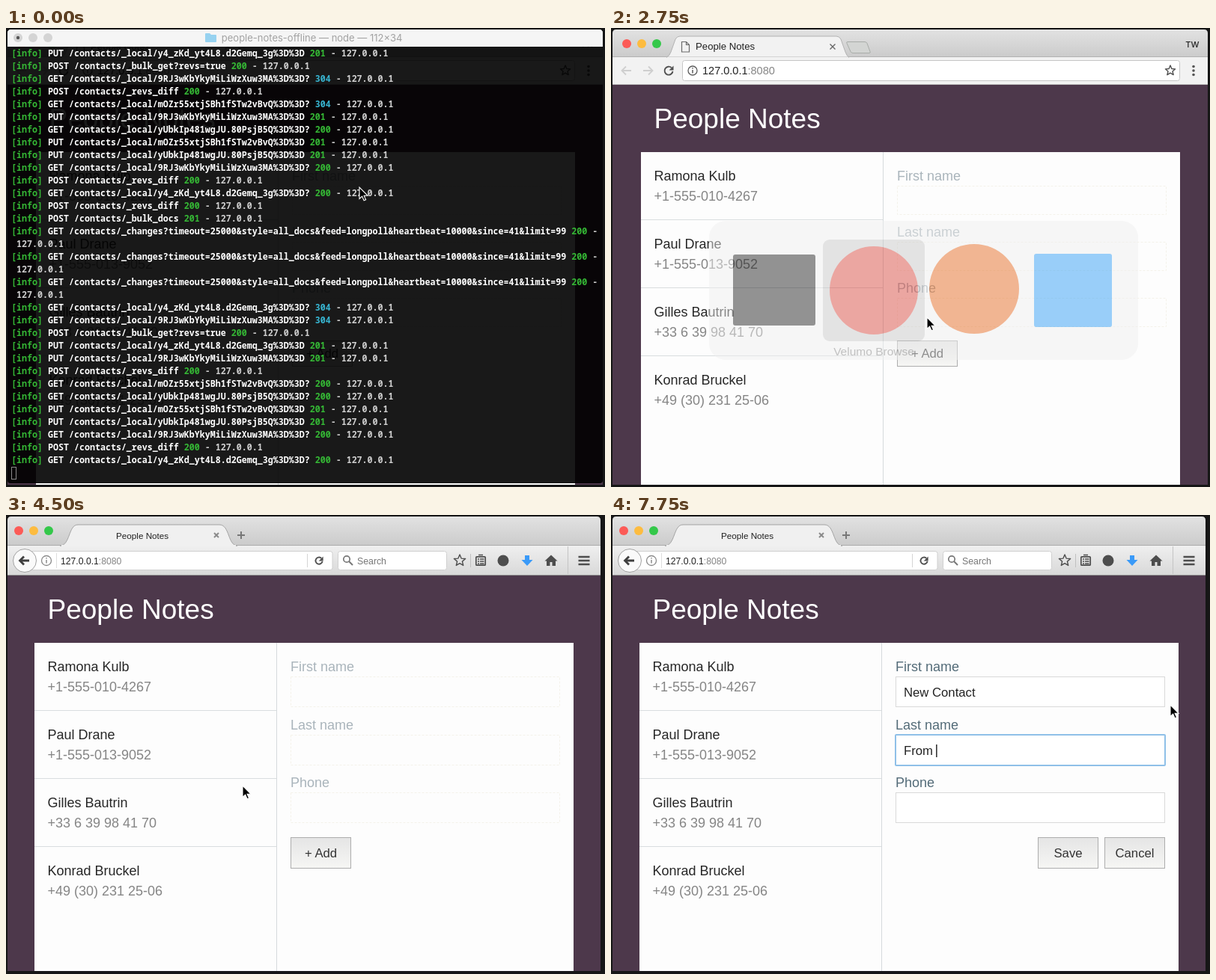
An HTML page that plays this animation: 800x614 px, repeating every 8 s.

```html
<!DOCTYPE html>
<html lang="en">
<head>
<meta charset="utf-8">
<title>Offline sync demo</title>
<style>
html, body { margin: 0; width: 100%; height: 100%; overflow: hidden; background: #161616; }
svg { display: block; width: 800px; height: 614px; font-family: "Liberation Sans", Arial, sans-serif; }
text { white-space: pre; }
.mono { font: 600 11.667px "Noto Sans Mono", "DejaVu Sans Mono", monospace; }
.ui { font-family: Inter, "Liberation Sans", sans-serif; }
</style>
</head>
<body>
<svg id="stage" viewBox="0 0 800 614">
  <defs>
    <linearGradient id="strip" x2="0" y2="1"><stop stop-color="#e2e2e2"/><stop offset="1" stop-color="#cbcbcb"/></linearGradient>
    <linearGradient id="bar" x2="0" y2="1"><stop stop-color="#f0f0f0"/><stop offset="1" stop-color="#d8d8d8"/></linearGradient>
    <linearGradient id="button" x2="0" y2="1"><stop stop-color="#e5e5e5"/><stop offset="1" stop-color="#f6f6f4"/></linearGradient>
    <linearGradient id="smoke" x2="0" y2="1"><stop stop-color="#737373"/><stop offset=".5" stop-color="#696969"/><stop offset="1" stop-color="#747474"/></linearGradient>
  </defs>
  <g id="scene"></g>
</svg>
<script>
const PURPLE = '#4d384b';
const APP = 'People Notes';
const FOLDER = 'people-notes-offline';
const PEOPLE = [
  ['Ramona Kulb', '+1-555-010-4267'],
  ['Paul Drane', '+1-555-013-9052'],
  ['Gilles Bautrin', '+33 6 39 98 41 70'],
  ['Konrad Bruckel', '+49 (30) 231 25-06'],
];

const text = (x, y, s, size, fill, more = '') =>
  `<text x="${x}" y="${y}" font-size="${size}" fill="${fill}" ${more}>${s}</text>`;
const rect = (x, y, w, h, fill, more = '') =>
  `<rect x="${x}" y="${y}" width="${w}" height="${h}" fill="${fill}" ${more}/>`;
const circle = (x, y, r, fill, more = '') =>
  `<circle cx="${x}" cy="${y}" r="${r}" fill="${fill}" ${more}/>`;
const line = (d, stroke, width = 1, more = '') =>
  `<path d="${d}" fill="none" stroke="${stroke}" stroke-width="${width}" ${more}/>`;
const shape = (d, fill, more = '') => `<path d="${d}" fill="${fill}" ${more}/>`;
const span = (s, fill) => `<tspan fill="${fill}">${s}</tspan>`;
const middle = 'text-anchor="middle"';

const lights = (x, y, colors = ['#fc5b57', '#fdbc40', '#34c84a']) =>
  colors.map((c, i) => circle(x + 20 * i, y, 6, c)).join('');

const star = (x, y, r) => {
  const points = Array.from({ length: 10 }, (_, i) => {
    const a = i * Math.PI / 5, q = i % 2 ? r * .45 : r;
    return `${x + q * Math.sin(a)},${y - q * Math.cos(a)}`;
  });
  return `<polygon points="${points.join(' ')}" fill="none" stroke="#4d4d4d" stroke-width="1.4" stroke-linejoin="round"/>`;
};
const info = (x, y, r, color) =>
  circle(x, y, r, 'none', `stroke="${color}" stroke-width="1.3"`) +
  line(`M${x} ${y - 1}v4.5M${x} ${y - 4}v1.6`, color, 1.5);
const reload = (x, y, r) =>
  line(`M${x + r * .7} ${y - r * .7}A${r} ${r} 0 1 0 ${x + r} ${y + 1}`, '#505050', 1.9) +
  shape(`M${x + r + 1} ${y - r - 1}v6h-6z`, '#505050');
const arrow = (x, y, dir, color, width) =>
  line(`M${x + 6 * dir} ${y}h${-12 * dir}m${5 * dir} -5.5l${-5.5 * dir} 5.5l${5.5 * dir} 5.5`, color, width);
const address = (x, y, size) =>
  text(x, y, span('127.0.0.1', '#222') + span(':8080', '#858585'), size, '#222');

// Web page; the two browsers differ in offset and control heights.
function page(left, top, right, bottom, lay, s) {
  let out = rect(2, top - 90, right - 2, bottom - top + 90, PURPLE);
  out += text(left + 17.5, top - 32, APP, 37, '#fff');
  out += rect(left, top, 720, bottom - top, '#fdfdfd');
  PEOPLE.forEach(([name, phone], i) => {
    const y = top + 91 * i;
    if (s.hover.includes(i)) out += rect(left, y, 323, 90, '#f1f1f1');
    if (i < 3) out += rect(left, y + 90, 323, 1, '#d9dddf');
    out += text(left + 17.5, y + 38, name, 18, '#262626') + text(left + 17.5, y + 65, phone, 18, '#858585');
  });
  out += rect(left + 323, top, 1, bottom - top, '#d5dadc');

  const x = left + 342;
  ['First name', 'Last name', 'Phone'].forEach((label, i) => {
    const y = Math.round(top + lay.pitch * i), box = y + 45.5;
    out += text(x, y + 38, label, 18, s.edit ? '#536b78' : '#a9b4bb');
    const border = s.edit ? 'stroke="#d9d9d9"' : 'stroke="#f4f2ea" stroke-dasharray="3 2"';
    out += rect(x + .5, box, 359, lay.input, s.edit ? '#fff' : 'none', border);
    if (!s.edit) return;
    const value = s.values[i] || '';
    if (s.focus === i) out += rect(x, box - .5, 360, lay.input + 1, 'none', 'stroke="#8fc0e8" stroke-width="2" rx="1"');
    const caret = s.focus === i ? '<tspan font-size="18" dx="-2" dy="-1">|</tspan>' : '';
    out += text(x + 11, box + 26.5, value + caret, 16.7, '#222');
  });

  const button = (bx, label) =>
    rect(bx + .5, top + lay.button + .5, 80, lay.buttonH, 'url(#button)', 'stroke="#adadad"') +
    text(bx + 40.5, top + lay.button + lay.buttonH / 2 + 6, label, 16.7, '#333', middle);
  return out + (s.edit ? button(x + 190, 'Save') + button(x + 279, 'Cancel') : button(x, '+ Add'));
}

function browserA(s) {
  return page(40, 166, 797, 611, { pitch: 75, input: 38, button: 252, buttonH: 34 }, s) +
    shape('M2 39V7q0-5 5-5H792q5 0 5 5V39z', 'url(#strip)') +
    rect(2, 38, 795, 1, '#b2b2b2') + rect(2, 39, 795, 37, '#f2f2f2') + rect(2, 75, 795, 1, '#bdbdbd') +
    shape('M74 39q4-1 6-7l6-17q2-4 6-4H301q4 0 6 4l6 17q2 6 5 7z', '#f2f2f2', 'stroke="#b2b2b2"') +
    rect(75, 39, 242, 2, '#f2f2f2') +
    lights(21, 21) +
    line('M94.5 18.5h6l4 4v9.5h-10zM100.5 18.5v4h4', '#6b6b6b', 1.2) +
    text(113, 29, APP, 13.2, '#222') +
    line('M292.5 21.5l7 7m0-7l-7 7', '#666', 1.4) +
    shape('M316 18.5h23q2 0 3 2l4 11q1 2-1 2h-22q-2 0-3-2l-5-11q-1-2 1-2z', '#d3d5d3', 'stroke="#a8aca8"') +
    text(785.5, 25.5, 'TW', 11, '#222', 'text-anchor="end" class="ui" font-weight="500"') +
    arrow(21, 57, 1, '#cfcfcf', 1.8) + arrow(49, 57, -1, '#cfcfcf', 1.8) + reload(77, 57, 5.5) +
    rect(95.5, 43.5, 664, 27, '#fff', 'rx="3" stroke="#c6c6c6"') +
    info(109, 57, 6, '#5a5a5a') + address(122, 62, 14.5) + star(747, 57, 7) +
    [51.5, 57, 62.5].map(y => circle(778, y, 1.8, '#555')).join('');
}

function browserB(s) {
  const dark = '#4d4d4d';
  return page(38, 171, 794, 610, { pitch: 77.7, input: 40, button: 260, buttonH: 41 }, s) +
    shape('M2 41V7q0-5 5-5H789q5 0 5 5V41z', 'url(#strip)') +
    rect(2, 40, 792, 41, 'url(#bar)') + rect(2, 40, 792, 1, '#ababab') + rect(2, 80, 792, 1, '#8d8d8d') +
    shape('M72 41c14 0 11-28 24-28H285c14 0 11 28 24 28z', '#f0f0f0', 'stroke="#a3a3a3"') +
    rect(74, 40, 233, 2, '#f0f0f0') +
    lights(17, 21) +
    text(147, 31.5, APP, 11.7, '#222') +
    line('M278 24l6 6m0-6l-6 6', '#8a8a8a', 2) + line('M314 22v10m-5-5h10', '#777', 2) +
    rect(30, 48.5, 406, 25, '#fff', 'rx="3" stroke="#d0d0d0"') +
    circle(25, 61, 15.5, '#fafafa', 'stroke="#a2a2a2"') + arrow(25, 61, 1, '#404040', 2.8) +
    info(54, 61, 6.5, '#8a8a8a') + rect(67, 51, 1, 20, '#ddd') + address(73, 66, 12.2) +
    rect(402, 52, 1, 18, '#d5d5d5') + reload(418, 61, 4.6) +
    rect(443.5, 48.5, 145, 25, '#fff', 'rx="3" stroke="#d0d0d0"') +
    circle(455, 59, 4.2, 'none', 'stroke="#777" stroke-width="1.7"') + line('M458 62l5 5', '#777', 2) +
    text(469, 66, 'Search', 12.3, '#777') +
    star(606, 61, 8) + rect(620, 52, 1, 18, '#c0c0c0') +
    rect(627.8, 55.8, 12.4, 11.4, 'none', `stroke="${dark}" stroke-width="1.7" rx="1"`) +
    line('M631 53.5h6M630 59h2m1 0h5.5M630 62h2m1 0h5.5M630 65h2m1 0h5.5', dark, 1.5) +
    circle(664, 61, 7.5, dark) +
    shape('M693 54h6v6h4.5l-7.5 8l-7.5-8h4.5z', '#3a9af8') +
    shape('M728 53.5l8.5 8h-2.5v6.5h-4.5v-5h-3v5h-4.5v-6.5h-2.5z', dark) +
    rect(750, 42, 1, 37, '#c4c4c4') +
    line('M764.5 56h15m-15 5h15m-15 5h15', dark, 2.6);
}

const PATHS = {
  y: '_local/y4_zKd_yt4L8.d2Gemq_3g%3D%3D',
  w: '_local/9RJ3wKbYkyMiLiWzXuw3MA%3D%3D',
  m: '_local/mOZr55xtjSBh1fSTw2vBvQ%3D%3D',
  u: '_local/yUbkIp481wgJU.80PsjB5Q%3D%3D',
  g: '_bulk_get?revs=true',
  r: '_revs_diff',
  d: '_bulk_docs',
  c: '_changes?timeout=25000&amp;style=all_docs&amp;feed=longpoll&amp;heartbeat=10000&amp;since=41&amp;limit=99',
};
const LOG = `PUT y 201,POST g 200,GET w? 304,POST r 200,GET m? 304,PUT w 201,GET u? 200,PUT m 201,PUT u 201,
GET w? 200,POST r 200,GET y? 200,POST r 200,POST d 201,GET c 200,GET c 200,GET c 200,GET y? 304,GET w? 304,
POST g 200,PUT y 201,PUT w 201,POST r 200,GET m? 200,GET u? 200,PUT m 201,PUT u 201,GET w? 200,POST r 200,GET y? 200`;
const GREEN = '#35b835', PALE = '#cfcfcf';
const ROWS = LOG.split(',').flatMap(entry => {
  const [verb, key, code] = entry.trim().split(' ');
  const head = span('[info]', GREEN) + ` ${verb} /contacts/${PATHS[key[0]]}${key[1] || ''} ` +
    span(code, code === '304' ? '#38b6d2' : GREEN);
  const host = span(' 127.0.0.1', PALE), dash = span(' -', PALE);
  return key === 'c' ? [head + dash, host] : [head + dash + host];
});
const PROMPT = `BasilBox:${FOLDER} tomaswerlind$ `;

function shell(s) {
  const rows = s.stopped
    ? [...ROWS.slice(2), '^C' + span('http-server stopped.', '#d0402c'), '', PROMPT] : ROWS;
  const ink = s.active ? '#404040' : '#a2a2a2';
  const caretX = s.stopped ? 7 + 7 * PROMPT.length : 7;
  return browserA(s) +
    shape('M2 24H797V605q0 4-4 4H6q-4 0-4-4z', '#000', 'opacity=".9"') +
    shape('M2 25V7q0-5 5-5H792q5 0 5 5V25z', s.active ? 'url(#strip)' : '#f5f5f5') +
    lights(16, 13, s.active ? undefined : ['#d4d4d4', '#d4d4d4', '#d4d4d4']) +
    (s.node ? circle(16, 13, 2.2, s.active ? '#7a1512' : '#555') : '') +
    shape('M266 8q0-1 1-1h5l2 2h6q1 0 1 1v8q0 1-1 1H267q-1 0-1-1z', '#6fc3ee', s.active ? '' : 'opacity=".7"') +
    text(529.5, 18, `${FOLDER} — ${s.node ? 'node' : 'bash'} — 112×34`, 13, ink, 'text-anchor="end" class="ui"') +
    rows.map((r, i) => text(7, 38 + 17 * i, r, 11.667, '#fff', 'class="mono"')).join('') +
    (s.active ? rect(caretX, 587, 7, 17, '#808080') : rect(7.5, 587.5, 6, 16, 'none', 'stroke="#8a8a8a"'));
}

// Application icons, each drawn around a centre x.
const ICONS = {
  prompt: x => rect(x - 55, 303, 110, 95, '#1f1f1f', 'rx="3"'),
  ball: x => circle(x, 351, 59, '#d9493f'),
  ember: x => circle(x, 349, 60, '#e5691f'),
  files: x => rect(x - 52, 302, 104, 98, '#2e9df5', 'rx="3"'),
};
const LABELS = { prompt: 'Prompter', ball: 'Velumo Browse', ember: 'Emberly' };

function switcher({ order, pick, dark, fade = 1 }) {
  const x = [218, 351, 485, 617], at = x[order.indexOf(pick)];
  return `<g opacity="${fade}">` +
    rect(131, 258, 573, 186, dark ? 'url(#smoke)' : '#efefef', `rx="${dark || fade < 1 ? 22 : 3}"`) +
    rect(at - 68, 283, 136, 136, dark ? '#4b4b4b' : '#c8c8c8', 'rx="9"') +
    order.map((name, i) => ICONS[name](x[i])).join('') +
    text(at, 437.5, LABELS[pick], 15.5, dark ? '#1c1c1c' : '#808080', middle) + '</g>';
}

const pointer = ([x, y]) =>
  shape('M0 0V15.5l3.6-3.3 2.5 5.6 2.5-1.1-2.5-5.4h5z', '#000',
    `stroke="#fff" stroke-width="1.1" transform="translate(${x} ${y})"`);

const fromShell = { order: ['prompt', 'ball', 'ember', 'files'], pick: 'ball', dark: true };
const fromBall = { order: ['ball', 'prompt', 'ember', 'files'], pick: 'prompt' };
const STEPS = [
  [0, { app: shell, node: true, at: [472, 213], hover: [], values: [] }],
  [250, { active: true }],
  [1000, { stopped: true, at: [447, 290] }],
  [1250, { node: false, at: [420, 355] }],
  [1500, { at: [422, 387] }],
  [1750, { tabs: fromShell }],
  [2750, { app: browserA, tabs: { ...fromShell, dark: false, fade: .48 } }],
  [3000, { tabs: null }],
  [3250, { at: [347, 286], hover: [1, 2] }],
  [3500, { at: [315, 361] }],
  [3750, { tabs: fromBall }],
  [4250, { tabs: { ...fromBall, pick: 'ember' } }],
  [4500, { app: browserB, tabs: null, hover: [], at: [316, 362] }],
  [4750, { hover: [2], at: [312, 418] }],
  [5000, { hover: [3], at: [383, 490] }],
  [5250, { hover: [], at: [404, 452], edit: true, focus: 0 }],
  [5500, { at: [747, 254] }],
  [6000, { values: ['Ne'] }],
  [6250, { values: ['New '] }],
  [6500, { values: ['New Con'] }],
  [6750, { values: ['New Conta'] }],
  [7000, { values: ['New Contact'] }],
  [7250, { focus: 1 }],
  [7500, { values: ['New Contact', 'F'] }],
  [7750, { values: ['New Contact', 'From '] }],
];

const scene = document.getElementById('scene');
const start = performance.now();
let shown = 0;
function frame() {
  const t = (performance.now() - start) % 8000;
  const past = STEPS.filter(([time]) => time <= t);
  if (past.length !== shown) {
    shown = past.length;
    const s = Object.assign({}, ...past.map(([, change]) => change));
    scene.innerHTML = s.app(s) + (s.tabs ? switcher(s.tabs) : '') + pointer(s.at);
  }
  requestAnimationFrame(frame);
}
frame();
</script>
</body>
</html>
```
